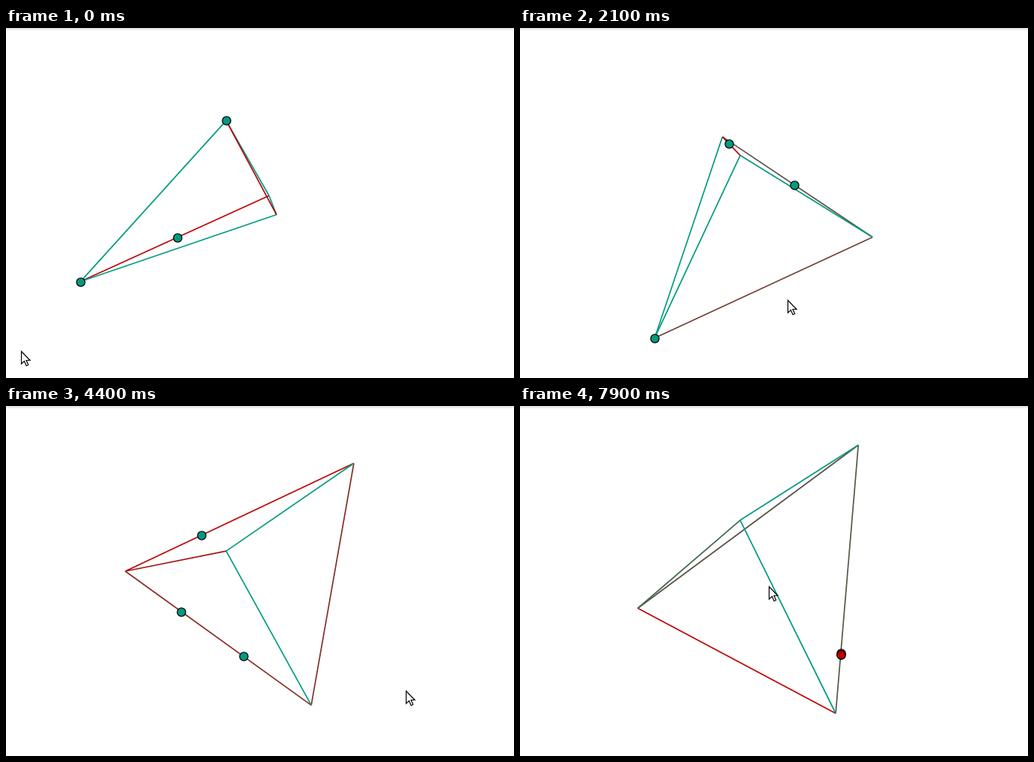
Write an HTML page with a canvas that moves like this. It is 676 px wide and 466 px high and loops after 8000 ms.

```html
<!DOCTYPE html>
<html lang="en">
<head>
<meta charset="utf-8">
<title>Rotating tetrahedron</title>
<style>
  html, body { margin: 0; width: 100%; height: 100%; overflow: hidden; background: #fff; }
  canvas { display: block; }
</style>
</head>
<body>
<canvas id="stage" width="676" height="466"></canvas>
<script>
const ctx = document.getElementById('stage').getContext('2d');
const LOOP = 8000, STEP = 100;
const CENTRE = [293, 218.8], UNIT = 100.7, CAMERA = 24;
const TEAL = [0, 155, 128], RED = [192, 0, 0];

// Corners as x, height, depth in units
const UP = 1.07;
const SOLID = { T: [0, UP, 0], P: [1, -UP, -1], Q: [0, UP, 2], R: [-2, -UP, 0] };

// Edges in drawing order: scent at the start and scent gained per walk
const EDGES = {
  QR: { seed: 1, gain: .6 }, PQ: { seed: 0, gain: 1 }, PR: { seed: 0, gain: 1 },
  TQ: { seed: 0, gain: 1 }, TR: { seed: 0, gain: 1 }, TP: { seed: 1, gain: 1 }
};
const FADE = 5000;

// Two drags turn the solid: [ms, turn, tilt] in degrees
const VIEW = [
  [1250, 14.9, 30], [2100, 55.2, 64], [3000, 87.3, 78.8], [4400, 125.3, 76.8],
  [4700, 125.8, 72.5], [7600, 125.8, 72.5], [7900, 129, 53.3]
];

// Pointer tip: [ms, x, y]
const POINTER = [
  [0, 20, 430], [900, 213, 302], [1250, 255, 277], [2100, 356, 362], [3000, 445, 401],
  [4400, 532, 379], [5100, 591, 372], [5300, 591, 372], [5600, 523, 424],
  [6200, 518, 452], [6700, 518, 452], [7600, 328, 206], [7900, 331, 240]
];

// Legs: path, start ms, end ms, and the part of the edge covered
const WALKERS = [
  { red: [[2950, 3300], [7650, LOOP]],
    legs: [['TP', 640, 3000], ['PR', 3000, 7650], ['RQ', 7680, 8680]] },
  { red: [[7650, LOOP]],
    legs: [['RQ', -1050, 500, .7 - .55, 1], ['QP', 1060, 3060], ['PR', 3080, 4400, 0, .634],
           ['PR', 4400, 6200, .634, .76], ['PR', 6200, 6650, .76, 1], ['RQ', 7675, 8675]] },
  { red: [[4800, LOOP]],
    legs: [['RQ', 2150, 3150], ['QP', 3600, 4800], ['PR', 4800, 6650], ['RQ', 7680, 8680]] }
];
// The second walker is halfway along its first edge when the loop opens.
WALKERS[1].legs[0] = ['RQ', -530, 500];

const mix = (a, b, k) => a + (b - a) * k;
const clamp = k => Math.min(1, Math.max(0, k));
const edgeOf = path => path in EDGES ? path : path[1] + path[0];

function at(keys, t) {
  const i = keys.findIndex(key => key[0] > t);
  if (i <= 0) return keys.at(i).slice(1);
  const a = keys[i - 1], b = keys[i];
  return a.slice(1).map((v, j) => mix(v, b[j + 1], (t - a[0]) / (b[0] - a[0])));
}

function project([x, h, z], turn, tilt) {
  const sx = x * Math.cos(turn) + z * Math.sin(turn);
  const sz = z * Math.cos(turn) - x * Math.sin(turn);
  const near = sz * Math.cos(tilt) + h * Math.sin(tilt);
  const scale = UNIT * CAMERA / (CAMERA - near);
  return [CENTRE[0] + scale * sx,
          CENTRE[1] + scale * (sz * Math.sin(tilt) - h * Math.cos(tilt))];
}

function corners(t) {
  const [turn, tilt] = at(VIEW, t).map(deg => deg * Math.PI / 180);
  return Object.fromEntries(
    Object.entries(SOLID).map(([name, p]) => [name, project(p, turn, tilt)]));
}

// Walking leaves scent that fades; the strongest edge is fully red.
function scents(t) {
  const raw = {};
  for (const name in EDGES) raw[name] = EDGES[name].seed * Math.exp(-t / FADE);
  for (const { legs } of WALKERS) {
    for (const [path, start, end, k0 = 0, k1 = 1] of legs) {
      if (start < 0 || t < start) continue;
      const walked = (k1 - k0) * clamp((t - start) / (end - start));
      const edge = edgeOf(path);
      raw[edge] += EDGES[edge].gain * walked * Math.exp(-Math.max(0, t - end) / FADE);
    }
  }
  const top = Math.max(...Object.values(raw));
  for (const name in raw) raw[name] = (raw[name] / top) ** .8;
  return raw;
}

const shade = heat => `rgb(${TEAL.map((c, i) => Math.round(mix(c, RED[i], heat)))})`;

function outline(fill, width) {
  ctx.fillStyle = fill;
  ctx.strokeStyle = '#000';
  ctx.lineWidth = width;
  ctx.fill();
  ctx.stroke();
}

function drawWalker({ legs, red }, pts, t) {
  const leg = legs.filter(l => l[1] <= t).pop() || legs[0];
  const [path, start, end, k0 = 0, k1 = 1] = leg;
  const k = mix(k0, k1, clamp((t - start) / (end - start)));
  const [x, y] = pts[path[0]].map((v, i) => Math.round(mix(v, pts[path[1]][i], k)) + .5);
  ctx.beginPath();
  ctx.arc(x, y, 5.6, 0, 7);
  outline(shade(red.some(([a, b]) => t >= a && t < b) ? 1 : 0), 1.3);
}

function drawPointer(t) {
  const [x, y] = at(POINTER, t).map(v => Math.round(v) + .5);
  ctx.save();
  ctx.translate(x, y);
  ctx.beginPath();
  ctx.stroke(new Path2D());
  const arrow = new Path2D('M0 0V16.6L3.9 13L6.6 19.2L9.2 18L6.5 12H11.5Z');
  ctx.fillStyle = '#fff';
  ctx.strokeStyle = '#000';
  ctx.lineWidth = 1.2;
  ctx.fill(arrow);
  ctx.stroke(arrow);
  ctx.restore();
}

const shadow = ctx.createLinearGradient(0, 0, 0, 4);
shadow.addColorStop(0, '#dcdcdc');
shadow.addColorStop(1, '#fff');

function draw(t) {
  ctx.fillStyle = '#fff';
  ctx.fillRect(0, 0, 676, 466);
  ctx.fillStyle = shadow;
  ctx.fillRect(0, 0, 676, 4);

  const pts = corners(t), heat = scents(t);
  ctx.lineWidth = 1.7;
  for (const name in EDGES) {
    ctx.beginPath();
    ctx.moveTo(...pts[name[0]]);
    ctx.lineTo(...pts[name[1]]);
    ctx.strokeStyle = shade(heat[name]);
    ctx.stroke();
  }
  WALKERS.forEach(w => drawWalker(w, pts, t));
  drawPointer(t);
}

const begin = performance.now();
function tick() {
  const t = (performance.now() - begin) % LOOP;
  draw(t - t % STEP);
  requestAnimationFrame(tick);
}
tick();
</script>
</body>
</html>
```
